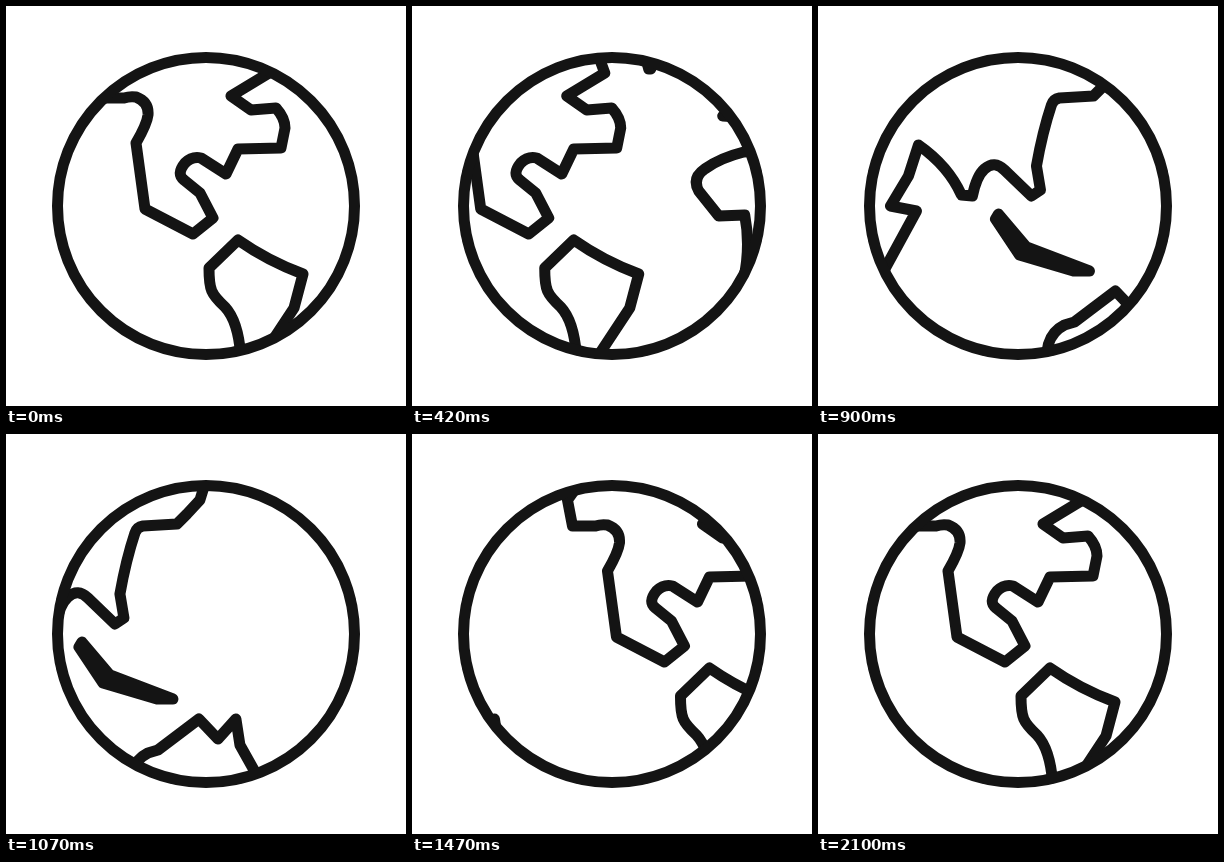
These frames come from a looping animation (400 px wide and 400 px high, 2.12 s). An HTML page:

```html
<!DOCTYPE html>
<html lang="en">
<head>
<meta charset="utf-8">
<title>Turning globe</title>
<style>
  html, body { margin: 0; width: 100%; height: 100%; overflow: hidden; background: #fff; }
  svg { display: block; width: 100vw; height: 100vh; }
</style>
</head>
<body>
<svg viewBox="0 0 400 400">
  <defs>
    <clipPath id="disc"><circle cx="200" cy="200" r="148.5"/></clipPath>
    <g id="land">
      <!-- Americas and Greenland -->
      <path d="M105 45L90 66L95 92H118Q124 90 130 91Q143 96 142 109Q141 118 130 137L139 203L187 228L207 212L194 187L178 174Q170 168 179 157Q186 150 195 152L220 168L232 143L275 142L279 122Q279 112 270 102L245 104L225 90L263 67L255 45"/>
      <path d="M235 354Q233 316 219 301C205 288 203 284 203 262L232 234Q262 255 297 268L288 302L255 352"/>
      <path d="M303 48L307 63H309L315 48"/>
      <!-- Africa and Eurasia -->
      <g transform="translate(228)">
        <path d="M163 46L167 62L205 80L153 110L184 112L233 128L221 156Q209 161 200 156Q188 143 174 146Q150 152 135 163Q122 172 129 185L149 210L175 209Q181 240 174 273Q184 295 202 306Q210 303 216 293L264 205L238 200L256 170L266 139Q296 160 309 189L320 190Q324 170 332 163Q342 154 352 164L379 190L388 184L384 160Q390 126 399 99Q401 93 407 92L441 90L451 80L464 66L472 40"/>
        <path d="M234 48L243 71L264 67L262 46"/>
      </g>
      <!-- Islands and Australia -->
      <g transform="translate(392)">
        <path d="M182 208L210 241L273 265H257L203 249L179 213Z"/>
        <path d="M229 354L232 338Q236 325 248 319L258 316L299 285L318 305L336 285L340 311L354 336L358 354"/>
      </g>
    </g>
  </defs>
  <g fill="none" stroke="#141414" stroke-width="11" stroke-linecap="round" stroke-linejoin="round">
    <g clip-path="url(#disc)">
      <g id="map">
        <use href="#land"/>
        <use href="#land" x="711"/>
      </g>
    </g>
    <circle cx="200" cy="200" r="148.5"/>
  </g>
</svg>
<script>
  const LOOP = 2120, STEP = 25, START = 100, DURATION = 2000, MAP_WIDTH = 711;
  const map = document.getElementById('map');

  // cubic-bezier(.33, 0, .33, 1), solved by bisection
  function ease(x) {
    if (x <= 0) return 0;
    if (x >= 1) return 1;
    let low = 0, high = 1;
    for (let i = 0; i < 30; i++) {
      const s = (low + high) / 2;
      if (0.99 * s * (1 - s) + s ** 3 < x) low = s; else high = s;
    }
    return low * low * (3 - 2 * low);
  }

  // Steps of 25 ms, each shown from its start rounded down to 10 ms
  function stepTime(t) {
    return Math.floor((Math.floor(t / 10) * 10 + 5) / STEP) * STEP;
  }

  function draw(t) {
    const shift = MAP_WIDTH * ease((stepTime(t) - START) / DURATION);
    map.setAttribute('transform', `translate(${-shift.toFixed(2)})`);
  }

  const origin = performance.now();
  function tick() {
    draw((performance.now() - origin) % LOOP);
    requestAnimationFrame(tick);
  }
  tick();
</script>
</body>
</html>
```
